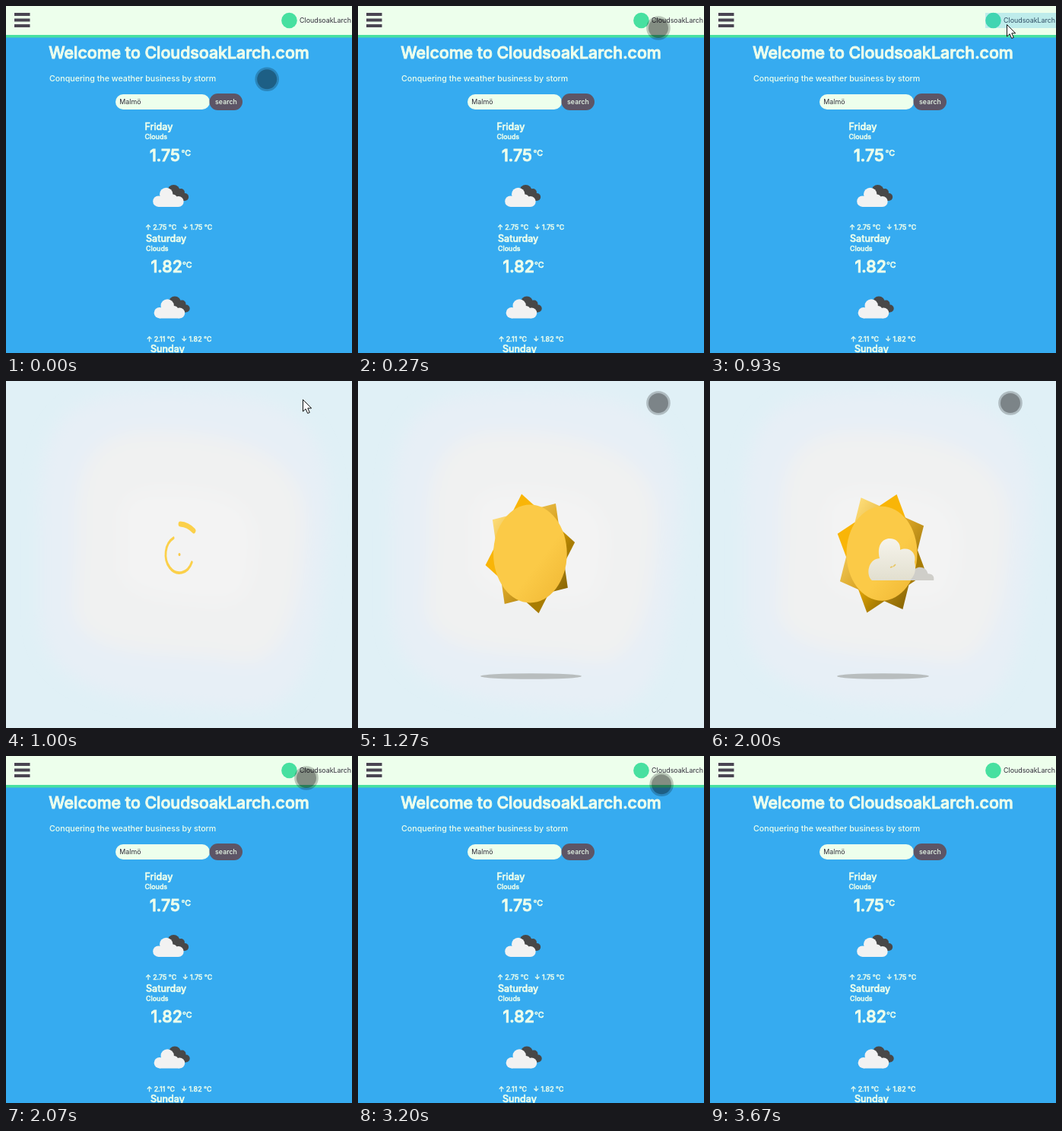
Write an HTML page that moves like this. It is 455x456 px and loops after 4.54 s.

```html
<!DOCTYPE html>
<html lang="en">
<head>
<meta charset="utf-8">
<title>Weather forecast</title>
<style>
  html, body { margin: 0; width: 100%; height: 100%; overflow: hidden; background: #36abf0; }
  svg { display: block; width: 100%; height: 100%; }
  text { font: 500 10.67px Inter, "Open Sans", sans-serif; font-optical-sizing: none; fill: #edffec; white-space: pre; }
  .bold { stroke: #edffec; stroke-width: .045em; }
  .h1 { font-size: 21.33px; }
  .h3 { font-size: 12.48px; }
  .h5 { font-size: 8.85px; }
  .ui { font-size: 8.89px; }
  .dark { fill: #2f2b38; font-weight: 400; }
</style>
</head>
<body>
<svg viewBox="0 0 455 456" xmlns="http://www.w3.org/2000/svg">
  <defs>
    <filter id="soft" x="-20%" y="-20%" width="140%" height="140%"><feGaussianBlur stdDeviation="11"/></filter>
    <linearGradient id="gold" gradientUnits="userSpaceOnUse" x1="-58" y1="-58" x2="58" y2="58">
      <stop offset=".45" stop-color="#f9b507"/><stop offset=".75" stop-color="#a87c02"/>
    </linearGradient>
    <linearGradient id="pale" gradientUnits="userSpaceOnUse" x1="-58" y1="-58" x2="58" y2="58">
      <stop offset="0" stop-color="#ffdf7c"/><stop offset=".5" stop-color="#dba626"/><stop offset="1" stop-color="#866300"/>
    </linearGradient>
    <linearGradient id="face" x1="0" y1="0" x2="1" y2="1">
      <stop offset=".6" stop-color="#fbca47"/><stop offset="1" stop-color="#efb632"/>
    </linearGradient>
    <linearGradient id="puff" x1="0" y1="0" x2="0" y2="1">
      <stop offset="0" stop-color="#f6f4ec"/><stop offset="1" stop-color="#e2dfcf"/>
    </linearGradient>
    <g id="clouds">
      <g fill="#484848">
        <circle cx="220.5" cy="243" r="8"/><circle cx="230" cy="245" r="5"/>
        <circle cx="235.2" cy="251" r="5"/><rect x="222" y="246" width="13" height="10"/>
      </g>
      <g fill="#f2f2f2">
        <circle cx="200.5" cy="256.7" r="7.3"/><circle cx="210.7" cy="247.5" r="8.7"/>
        <circle cx="219.5" cy="253" r="5.5"/><circle cx="226.700" cy="257" r="7"/>
        <rect x="200.5" y="252" width="26" height="12"/>
      </g>
    </g>
  </defs>

  <g id="page">
    <rect width="455" height="456" fill="#36abf0"/>
    <rect width="455" height="38" fill="#edffec"/>
    <rect y="38" width="455" height="3.500" fill="#47e0a0"/>
    <path d="M11 11H31.500M11 18.500H31.500M11 26H31.500" stroke="#4a4552" stroke-width="3.800"/>
    <circle cx="372.5" cy="19" r="10.3" fill="#47e0a0"/>
    <text class="ui dark" x="386" y="22.3">CloudsoakLarch</text>
    <rect id="tap" x="362" y="9" width="93" height="20" fill="#33b5e5" opacity=".25"/>

    <text class="h1 bold" x="227.5" y="69.3" text-anchor="middle">Welcome to CloudsoakLarch.com</text>
    <text x="57" y="99">Conquering the weather business by storm</text>
    <rect x="144" y="116" width="124" height="20" rx="10" fill="#edffec"/>
    <text class="ui dark" x="149.3" y="129.2">Malmö</text>
    <rect x="267.5" y="115" width="43.5" height="22" rx="11" fill="#5d5566"/>
    <text class="ui" x="289.5" y="129" text-anchor="middle">search</text>
    <g id="days"></g>
    <text class="h3 bold" x="190" y="455">Sunday</text>
  </g>

  <g id="loader">
    <rect width="455" height="456" fill="#e0f0f6"/>
    <g filter="url(#soft)">
      <path fill="#e7eff6" d="M45 200C40 60 70 14 200 14S432 20 424 180 400 440 310 432 40 430 45 300Z"/>
      <path fill="#f0f1f1" d="M94 200C92 110 110 65 200 67S397 90 393 190 370 382 300 367 84 372 90 290Z"/>
      <path fill="#f3f3f3" d="M148 200C145 150 160 138 220 140S335 150 330 220 310 300 250 294 145 280 148 240Z"/>
    </g>
    <ellipse id="shade" cx="227.5" cy="388" ry="3.8" fill="#b8bdbe"/>
    <g id="sun">
      <polygon id="diamond" fill="url(#gold)"/>
      <polygon id="square" fill="url(#pale)"/>
      <circle id="disc" fill="url(#face)"/>
      <g fill="none" stroke="#fbd04a" stroke-linecap="round">
        <path id="ring"/><path id="outer"/>
      </g>
    </g>
    <path id="small" fill="#cfcec9" d="M-8.500 0C-9 -3 -6 -5 -4 -4.500C-3 -9 4 -9 5 -4C8 -4 9 -2 8.500 0Z"/>
    <g id="puffy">
      <path fill="url(#puff)" d="M-27 0C-35 -6 -33 -28 -17 -29C-21 -46 -13 -55 -4 -55C5 -55 11 -49 10 -40C22 -45 32 -36 29 -24C32 -12 28 -5 23 0Z"/>
      <path fill="none" stroke="#e8c45c" stroke-width="1.6" d="M-3 -17l3 -1m1 0l3 -3"/>
    </g>
  </g>

  <g id="touch">
    <circle r="15.800" opacity=".22"/><circle r="13" opacity=".29"/>
  </g>
  <path id="arrow" transform="translate(390.500 24.500)" fill="#fff" stroke="#111"
    d="M0 0V15.500L3.600 12.200L6.200 18L8.800 16.900L6.300 11.300H11.200Z"/>
</svg>
<script>
const LOOP = 4540, TICK = 1000 / 15;
const $ = id => document.getElementById(id);
const set = (id, attrs) => { for (const k in attrs) $(id).setAttribute(k, attrs[k]); };
const show = (id, on) => { $(id).style.display = on ? "" : "none"; };
const place = (id, x, y, scale) => set(id, { transform: `translate(${x} ${y}) scale(${scale})` });

const span = (t, from, to) => Math.min(1, Math.max(0, (t - from) / (to - from)));
const easeOut = p => 1 - (1 - p) ** 2;
const backOut = (p, s = 1.2) => 1 + (s + 1) * (p - 1) ** 3 + s * (p - 1) ** 2;
const mix = (a, b, p) => a + (b - a) * p;
const bend = (a, b, c, p) => mix(mix(a, b, p), mix(b, c, p), p);

function dayMarkup([name, temp, max, min], i) {
  const x = 182.5 + 1.5 * i, y = 163.2 + 146.5 * i;
  const label = (cls, dx, dy, s) => `<text class="${cls} bold" x="${x + dx}" y="${y + dy}">${s}</text>`;
  return label("h3", 0, 0, name)
    + label("h5", 0, 12, "Clouds")
    + label("h1", 6.5, 40.3, temp)
    + label("", 48, 34, "°C")
    + `<use href="#clouds" x="${1.5 * i}" y="${146.5 * i}"/>`
    + label("h5", .7, 131, `↑ ${max} °C`)
    + label("h5", 49.5 - 3 * i, 131, `↓ ${min} °C`);
}
$("days").innerHTML = [
  ["Friday", "1.75", "2.75", "1.75"],
  ["Saturday", "1.82", "2.11", "1.82"]
].map(dayMarkup).join("");

const polar = (r, deg) => {
  const a = deg * Math.PI / 180;
  return (r * Math.cos(a)).toFixed(2) + " " + (r * Math.sin(a)).toFixed(2);
};
const quad = (r, turn) => [0, 90, 180, 270].map(a => polar(r, a + turn)).join(" ");

function arc(id, r, from, sweep, width) {
  const large = sweep > 180 ? 1 : 0;
  set(id, { d: `M${polar(r, from)}A${r} ${r} 0 ${large} 1 ${polar(r, from + sweep)}`, "stroke-width": width });
  show(id, width > 0);
}

function drawSun(t) {
  const p = span(t, 1000, 1200);
  arc("ring", 24 + 30 * p, 25, 219 + 140 * p, 3.7 * (1 - p * p));
  arc("outer", 40 + 22 * p, 150 * p - 88, 36 + 180 * p, 7 * (1 - p));

  const move = span(t, 1000, 1330);
  const rays = 82 * backOut(span(t, 1100, 1500)), turn = 2.5 + (t - 1600) * .04;
  place("sun", mix(228, 226, move), mix(228, 226.7, move), ".75 1");
  set("diamond", { points: quad(rays, turn) });
  set("square", { points: quad(rays, turn + 45) });
  set("disc", { r: 2 + 60 * backOut(span(t, 1050, 1450)) });
  set("shade", { rx: 60.5 * backOut(span(t, 1100, 1590), 2.6) });
  place("puffy", 240, 262, backOut(span(t, 1380, 1600)));
  place("small", 275.5, 262, 2.2 * easeOut(span(t, 1530, 1800)));
}

function touchAt(t) {
  if (t < 3200) {
    const p = easeOut(span(t, 0, 267));
    return [mix(343, 395, p), mix(96.5, 29, p)];
  }
  const p = span(t, 3200, 3600);
  return [bend(399, 460, 170, p), bend(37, 160, 440, p)];
}

function draw(time) {
  const t = Math.floor((time % LOOP + 4) / TICK) * TICK + .5;
  const loading = t >= 1000 && t < 2066;
  const arrow = t >= 866 && t < 1200;
  show("page", !loading);
  show("loader", loading);
  if (loading) drawSun(t);
  show("tap", t >= 800 && t < 1000);
  show("arrow", arrow);
  show("touch", !arrow && t < 3666);
  place("touch", ...touchAt(t), 1);
}

const start = performance.now();
function frame() {
  draw(performance.now() - start);
  requestAnimationFrame(frame);
}
frame();
</script>
</body>
</html>
```
